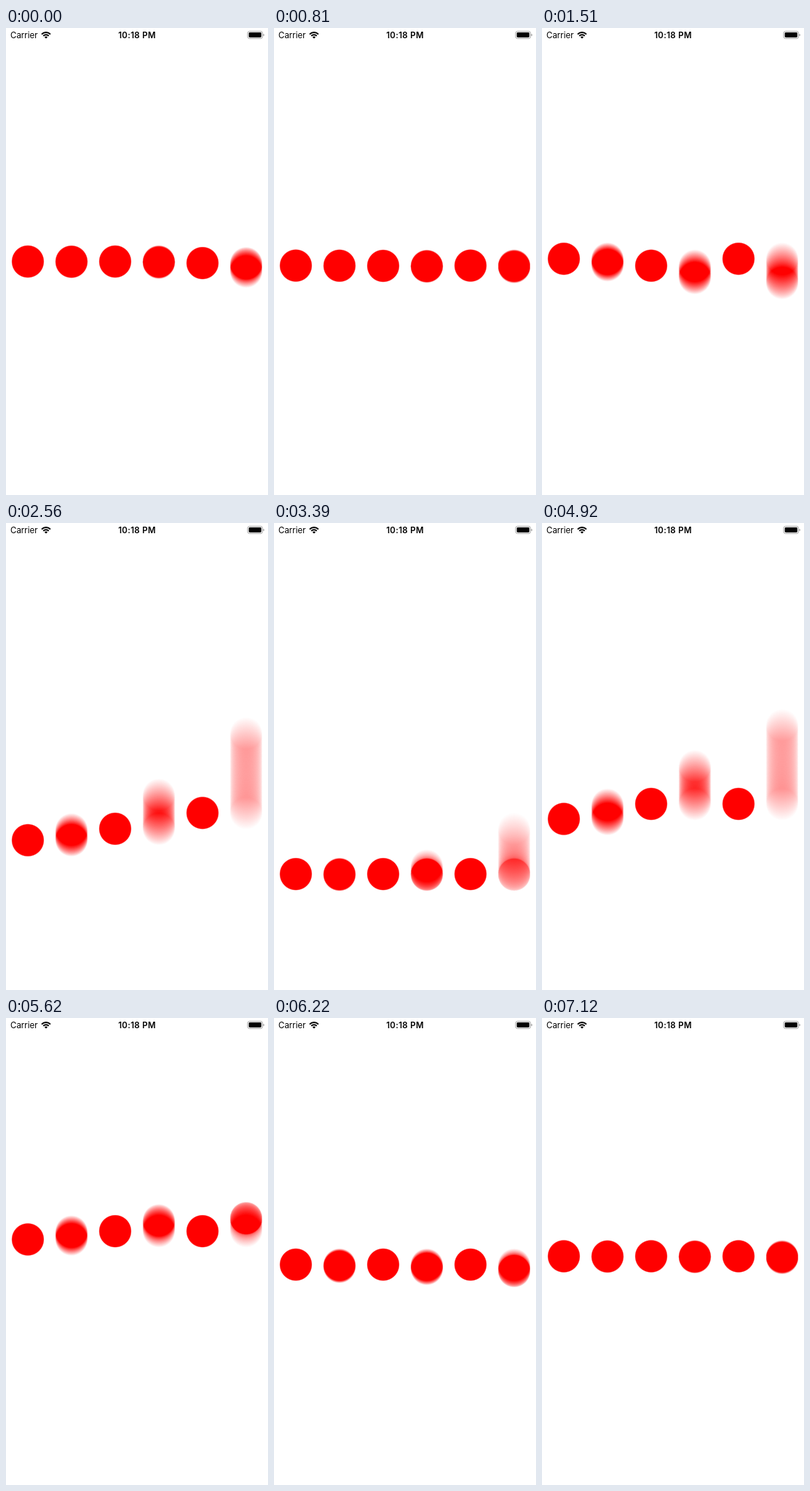
Recreate the animation shown at these times as an HTML page with a canvas. Size 360 by 640 pixels, loop 7170 ms.

```html
<!DOCTYPE html>
<html lang="en">
<head>
<meta charset="utf-8">
<title>Motion blur dots</title>
<style>
  html, body { margin: 0; width: 100%; height: 100%; overflow: hidden; background: #fff; }
  canvas { display: block; width: 360px; height: 640px; }
</style>
</head>
<body>
<canvas id="stage" width="360" height="640"></canvas>
<script>
const ctx = document.getElementById('stage').getContext('2d');
const LOOP = 7170;
const TICK_RATE = 0.0594;   // simulation ticks per ms of playback
const RADIUS = 22;
const SOFT = 0.7;
const SAMPLES = 16;         // blur poses per tick
const FONT = 'Inter, "Liberation Sans", sans-serif';

// Start of each held picture: 100 ms apart, a few 10 ms longer.
// The first one begins just before the loop does.
const isLong = n => (n >= 18 && n <= 22) || (n >= 27 && n <= 29) || (n >= 42 && n <= 44);
const starts = [-10, 110];
for (let n = 1; n < 70; n++) starts.push(starts[n] + (isLong(n) ? 110 : 100));

// Fast swing inside a slow raised-cosine swell, 60 ticks a second.
function posY(tick) {
  const s = tick / 60;
  const swell = 78 * (1 - Math.cos(s - 0.49));
  return 329.3 + swell * Math.cos(16 * s + 3.07);
}

function dot(x, y, alpha) {
  const edge = ctx.createRadialGradient(x, y, RADIUS - SOFT, x, y, RADIUS + SOFT);
  edge.addColorStop(0, `rgba(255, 0, 0, ${alpha})`);
  edge.addColorStop(1, 'rgba(255, 0, 0, 0)');
  ctx.fillStyle = edge;
  ctx.beginPath();
  ctx.arc(x, y, RADIUS + SOFT, 0, Math.PI * 2);
  ctx.fill();
}

// Sharp dot, and beside it the average of all poses over the last ticks.
function pair(x, tick, ticks) {
  dot(x, posY(tick), 1);
  const count = ticks * SAMPLES;
  ctx.globalCompositeOperation = 'lighter';
  for (let i = 0; i < count; i++) dot(x + 60, posY(tick - i / SAMPLES), 1 / count);
  ctx.globalCompositeOperation = 'source-over';
}

function label(text, x, weight, align, spacing) {
  ctx.font = `${weight} 11.5px ${FONT}`;
  ctx.textAlign = align;
  ctx.letterSpacing = spacing;
  ctx.fillText(text, x, 14);
}

function wifi(x, y) {
  const from = -Math.PI * 0.75, to = -Math.PI * 0.25;
  ctx.lineWidth = 2;
  for (const r of [5.3, 8.5]) {
    ctx.beginPath();
    ctx.arc(x, y, r, from, to);
    ctx.stroke();
  }
  ctx.beginPath();
  ctx.moveTo(x, y);
  ctx.arc(x, y, 3, from, to);
  ctx.fill();
}

function battery() {
  ctx.strokeStyle = '#a6a6a6';
  ctx.lineWidth = 1;
  ctx.beginPath();
  ctx.roundRect(332, 4.5, 20.5, 10, 2.6);
  ctx.stroke();
  ctx.fillStyle = '#000';
  ctx.beginPath();
  ctx.roundRect(333.6, 6.1, 17.3, 6.8, 1.4);
  ctx.fill();
  ctx.fillStyle = '#a6a6a6';
  ctx.beginPath();
  ctx.arc(353.4, 9.5, 1.6, -Math.PI / 2, Math.PI / 2);
  ctx.fill();
}

function statusBar() {
  ctx.fillStyle = ctx.strokeStyle = '#000';
  label('Carrier', 6, 400, 'left', '0px');
  label('10:18 PM', 180, 600, 'center', '0.3px');
  wifi(55, 14.6);
  battery();
}

// Latest multiple of step, counted from offset.
const hold = (tick, step, offset) => Math.floor((tick - offset) / step) * step + offset;

function draw(t) {
  ctx.clearRect(0, 0, 360, 640);
  statusBar();
  const tick = Math.round(t * TICK_RATE);
  pair(30, tick, 1);
  pair(150, hold(tick, 2, 1), 2);
  pair(270, hold(tick, 3, 0), 4);
}

const begin = performance.now();
function loop() {
  const now = (performance.now() - begin) % LOOP;
  draw(starts.findLast(s => s <= now));
  requestAnimationFrame(loop);
}
loop();
</script>
</body>
</html>
```
